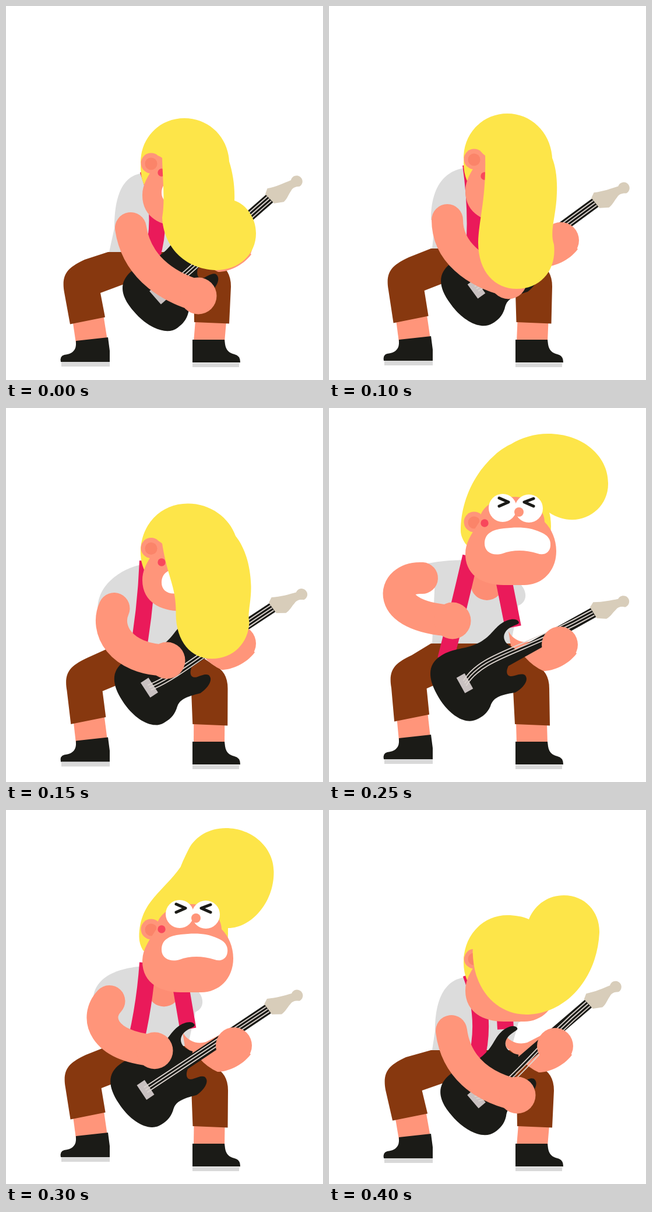
These frames come from a looping animation (544x640 px, 0.45 s). An HTML page:

```html
<!DOCTYPE html>
<html lang="en">
<head>
<meta charset="utf-8">
<title>Guitar player</title>
<style>
html, body { margin: 0; width: 100%; height: 100%; overflow: hidden; background: #fff; }
svg { display: block; width: 544px; height: 640px; }
.skin { fill: #ff957a; }
.hair { fill: #fde549; }
.black { fill: #1b1b17; }
.shirt { fill: #dcdcdc; }
.sole { fill: #d9d9d9; }
.strap { fill: none; stroke: #ea1a5a; stroke-width: 28; }
</style>
</head>
<body>
<svg viewBox="0 0 544 640">
  <path id="rightShin" class="skin"/>
  <path class="black" d="M320 571H375L376 579Q378 593 392 596 402 598 402 610H320Z"/>
  <path class="sole" d="M320 611H400V618H320Z"/>
  <path id="leftShin" class="skin"/>
  <g id="leftFoot">
    <path class="black" d="M120 573L175 567 178 590V609H94Q92 599 100 597 119 595 120 580Z"/>
    <path class="sole" d="M95 609H178V617H95Z"/>
  </g>
  <path id="trousers" fill="#87380f"/>
  <path id="shirt" class="shirt"/>
  <circle id="throat" cx="271" r="28" fill="#fd8d74"/>
  <path id="strapL" class="strap"/>
  <path id="strapR" class="strap"/>
  <path id="forearm" class="skin" d="M-88 -23C-79 -6 -62 -2 -48 -6L-11 -25 29 15C14 35 -11 45 -28 45Q-46 37 -59 22L-84 2Z"/>
  <g id="guitar">
    <path class="black" d="M70 -7.500H253V10.500H70Z"/>
    <path class="black" d="M-51 -7C-51 -42 -38 -60 -12 -61C12 -62 30 -50 50 -49C78 -47 88 -58 106 -59C118 -60 132 -55 132 -47C132 -41 122 -47 110 -45C94 -42 90 -26 104 -10L78 12C68 20 70 28 80 30C88 32 94 33 97 38C100 50 82 56 68 56C40 46 30 46 19 56C8 64 -2 65 -13 64C-38 62 -52 26 -51 -7Z"/>
    <path fill="#d8cdba" d="M251 -9L260 -14C274 -6 288 -2 300 2A10 10 0 1 1 304 20C298 15 293 14 288 16C280 18 274 22 266 22L252 13Z"/>
    <path fill="#c9c1c1" d="M-8 -15H8V15H-8Z"/>
    <path id="strings" fill="none" stroke="#ddd5d0" stroke-width="1.8"/>
  </g>
  <circle id="fretHand" class="skin" r="31"/>
  <path id="arm" fill="none" stroke="#ff957a" stroke-width="54" stroke-linecap="round"/>
  <circle id="pickHand" class="skin" r="31.5"/>
  <circle id="backHair" class="hair" cx="306" cy="203" r="75"/>
  <path id="hairBehind" class="hair"/>
  <g id="head">
    <path class="skin" d="M258 195C258 170 285 152 318 152C350 152 370 175 370 195C382 207 390 225 390 245C390 280 365 303 335 303H300C262 303 234 285 234 250C234 230 245 215 258 195Z"/>
    <g id="face">
      <circle cx="267" cy="197" r="6.7" fill="#f8475c"/>
      <g fill="#fff">
        <circle cx="298" cy="171" r="24"/>
        <circle cx="343" cy="172" r="24"/>
        <path d="M267 232C267 215 280 208 300 206C325 203 345 204 362 212C378 218 381 228 380 236C379 248 368 253 358 249C335 242 315 243 298 249C280 254 267 246 267 232Z"/>
      </g>
      <circle class="skin" cx="326" cy="178" r="8"/>
      <path d="M292 154L308 161 292 168M351 155L335 161 351 168" fill="none" stroke="#1b1b17" stroke-width="5" stroke-linecap="round" stroke-linejoin="round"/>
    </g>
  </g>
  <path id="hairFront" class="hair"/>
  <g id="ear">
    <circle class="skin" cx="249" cy="195" r="17.500"/>
    <circle cx="249" cy="196" r="10.500" fill="#fb8469"/>
  </g>
</svg>
<script>
const STEP = 50, COUNT = 9;

// leg: knee x, knee y, foot y, waist y, right knee x
// arm: cubic from shoulder to hand; neck: top of shirt, shoulder slope
// head: drop, extra drop of the face
const keys = {
  0: { guitar: [262, 494, -41.2], bow: [8], arm: [214, 380, 223, 440, 268, 478, 330, 496], hand: [392, 410],
       leg: [0, 0, 0, 421, 0], neck: [286, 15], strap: [272, 250], head: [74, 14],
       hair: 'M231 270C230 225 264 192 306 192C348 192 381 224 383 266C389 285 393 308 392 333C413 340 429 363 429 389C429 425 400 452 360 452C305 450 270 410 268 362C273 335 269 300 268 260C255 250 236 255 231 270' },
  2: { guitar: [253, 484, -36.2], bow: [4], arm: [203, 366, 203, 420, 250, 456, 308, 470], hand: [398, 401],
       leg: [2, -4, -2, 415, -3], neck: [277, 15], strap: [255, 248], head: [67, 27],
       hair: 'M231 262C230 218 264 184 306 184C348 184 381 218 383 260C389 275 392 295 391 320C390 360 378 385 386 408C391 450 365 484 322 484C285 484 256 455 256 405C257 365 270 330 268 256C255 243 236 247 231 262' },
  4: { guitar: [239, 473, -30.4], bow: [16], arm: [168, 320, 136, 335, 139, 404, 244, 394], hand: [398, 405],
       leg: [7, -9, -5, 408, -8], neck: [258, 38], strap: [224, 200], head: [22, 18],
       hair: 'M231 240C229 180 268 143 318 143C355 143 385 158 405 178C432 204 447 245 450 290C452 305 450 318 449 325C441 355 415 374 385 374C350 374 328 345 327 300C328 245 285 255 268 208C255 197 236 200 231 240' },
  5: { guitar: [233, 471, -29.1], bow: [-28], arm: [160, 291, 105, 288, 92, 358, 212, 364], hand: [396, 405],
       leg: [7, -11, -8, 403, -8], neck: [260, 2], strap: [222, 200], head: [0, 0], behind: true,
       hair: 'M226 210C226 165 245 115 285 80C292 73 305 65 312 62C330 51 352 44 376 44C435 44 480 82 479 130C479 178 425 210 378 179C400 250 260 265 234 232C230 226 226 218 226 210' },
  7: { guitar: [246, 487, -38.4], bow: [28], arm: [195, 363, 198, 420, 235, 450, 298, 459.5], hand: [386, 401],
       leg: [-3, -19, -22, 405, -2], neck: [275, 15], strap: [252, 228], head: [18, -4], behind: true,
       hair: 'M231 225C231 150 295 165 314 115C320 90 314 85 316 70C320 40 345 18 378 18C412 18 440 48 440 82C441 140 415 195 384 225C360 260 260 260 236 248C232 240 231 233 231 225' },
  8: { guitar: [253, 494, -40.6], bow: [30], arm: [210, 378, 218, 440, 262, 474, 323, 488], hand: [388, 404],
       leg: [-3, -11, -13, 411, 0], neck: [286, 15], strap: [272, 252], head: [59, 0], earUnder: true,
       hair: 'M231 262C230 215 264 180 306 180C319 180 332 182 343 187C354 160 378 146 403 146C440 146 465 175 464 210C460 290 405 350 338 350C290 350 250 310 247 250C247 246 246 242 247 238C240 238 231 245 231 262' }
};

const el = {};
document.querySelectorAll('[id]').forEach(e => el[e.id] = e);
const set = (id, name, value) => el[id].setAttribute(name, value);
const line = (id, d) => set(id, 'd', d);
const move = (id, x, y) => set(id, 'transform', `translate(${x} ${y})`);
const mid = (a, b) => a.map((v, i) => (v + b[i]) / 2);

function midPath(a, b) {
  const nums = b.match(/-?[\d.]+/g);
  let i = 0;
  return a.replace(/-?[\d.]+/g, v => (+v + +nums[i++]) / 2);
}

function between(a, b) {
  const p = { ...a };
  for (const k in a) {
    if (k === 'hair') p.hair = midPath(a.hair, b.hair);
    else if (Array.isArray(a[k])) p[k] = mid(a[k], b[k]);
  }
  return p;
}

const poses = Array.from({ length: COUNT }, (_, i) => keys[i] || between(keys[i - 1], keys[i + 1]));

function drawLegs([kx, ky, fy, waist, r]) {
  const hx = kx * .3, rx = r / 2;
  move('leftFoot', 0, fy);
  line('leftShin', `M${114 + hx} ${536 + fy}L${167 + hx} ${528 + fy} 174 ${572 + fy} 120 ${577 + fy}Z`);
  line('rightShin', `M${325 + rx} 538L${378 + rx} 540 375 575H322Z`);
  line('trousers', `M${110 + hx} ${544.5 + fy}L${100 + kx} ${490 + ky}
    C${94 + kx} ${457 + ky} ${108 + kx} ${447 + ky} ${135 + kx} ${434 + ky}
    L175 ${waist}H315L${362 + r} 440Q${386 + r} 450 ${386 + r} 480L${383 + rx} 543.5
    L${323 + rx} 541 ${322 + r * .8} 475 280 450 197 ${478 + ky}
    ${162 + kx * .8} ${491 + ky} ${170 + hx} ${532.5 + fy}Z`);
}

function drawTorso([n, slope], waist, sx, sy, [bend, end]) {
  const side = sx - 28;
  line('shirt', `M240 ${n}C215 ${n} ${side} ${n + slope} ${side} ${sy}H${Math.max(side, 182)}
    L177 ${waist}H312L325 ${n + 78}C342 ${n + 72} 342 ${n + 48} 320 ${n + 35}Z`);
  set('throat', 'cy', n + 41);
  line('strapL', `M243 ${n - 6}Q${bend} ${(n + 430) / 2} ${end} 430`);
  line('strapR', `M300 ${n + 35}L${366 - end / 4} 375`);
}

function drawGuitar([x, y, angle], bow) {
  set('guitar', 'transform', `translate(${x} ${y}) rotate(${angle})`);
  line('strings', [-5, 0, 5].map(o => `M0 ${o}C50 ${o + bow} 110 ${o + 1} 251 ${o + 1.5}`).join(''));
}

function drawArms(a, [hx, hy]) {
  line('arm', `M${a[0]} ${a[1]}C${a.slice(2).join(' ')}`);
  move('pickHand', a[6], a[7]);
  move('forearm', hx, hy);
  move('fretHand', hx, hy);
}

function drawHead(p) {
  const [drop, nod] = p.head;
  for (const id of ['backHair', 'head', 'ear']) move(id, 0, drop);
  move('face', 0, nod);
  line('hairBehind', p.behind ? p.hair : '');
  line('hairFront', p.behind ? '' : p.hair);
  el.head.parentNode.insertBefore(el.ear, p.behind || p.earUnder ? el.head : null);
}

function draw(ms) {
  const p = poses[Math.floor(ms / STEP) % COUNT];
  drawLegs(p.leg);
  drawTorso(p.neck, p.leg[3], p.arm[0], p.arm[1], p.strap);
  drawGuitar(p.guitar, p.bow[0]);
  drawArms(p.arm, p.hand);
  drawHead(p);
}

const start = performance.now();
function tick() {
  draw(performance.now() - start);
  requestAnimationFrame(tick);
}
tick();
</script>
</body>
</html>
```
